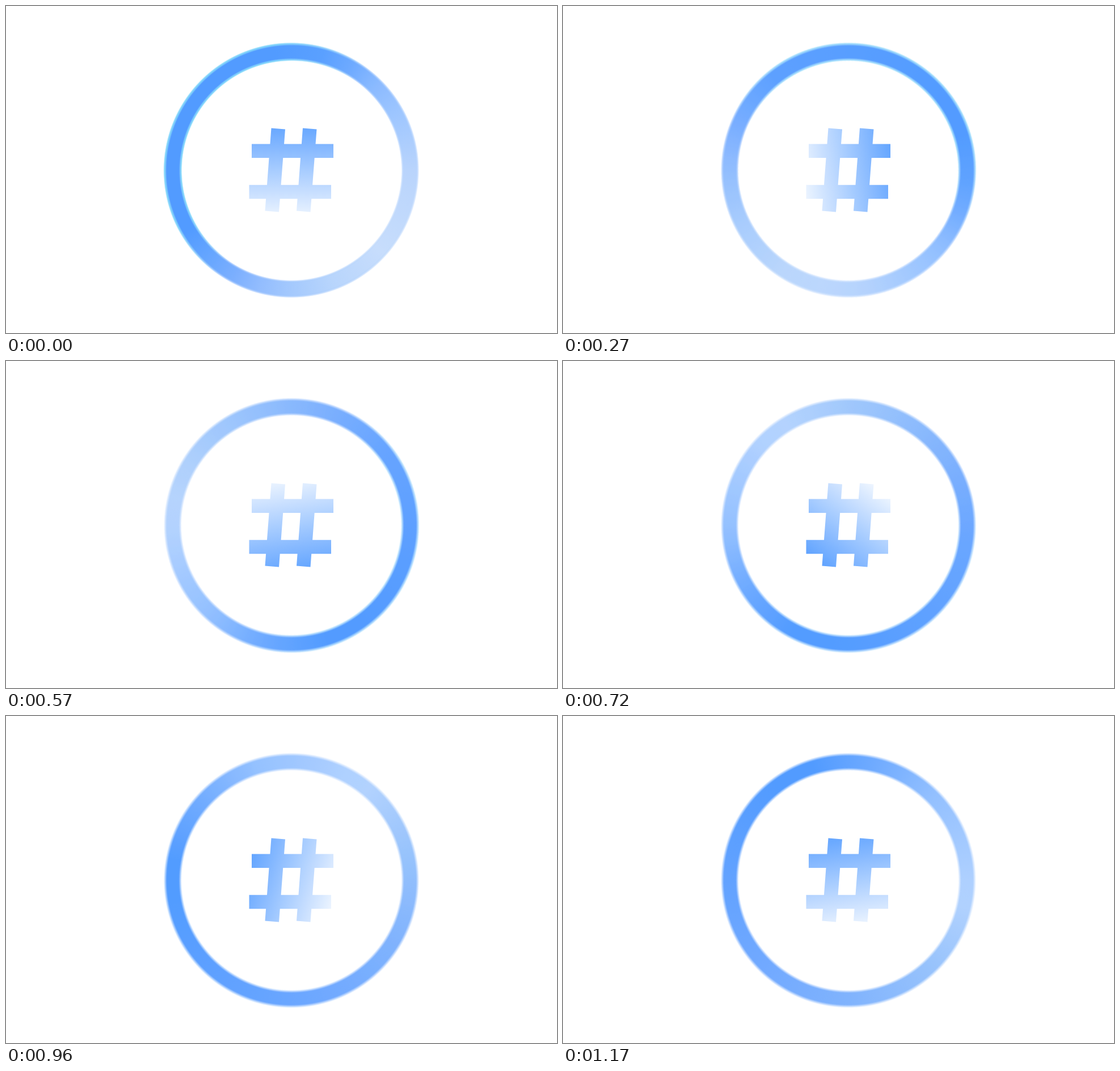
These frames come from a looping animation (971x577 px, 1200 ms). An HTML page:

```html
<!DOCTYPE html>
<html lang="en">
<head>
<meta charset="utf-8">
<title>Loading ring</title>
<style>
  html, body {
    margin: 0;
    width: 100%;
    height: 100%;
    overflow: hidden;
    background: #fff;
  }
  .stage {
    position: relative;
    width: 971px;
    height: 577px;
    overflow: hidden;
  }
  .ring {
    position: absolute;
    left: 273px;
    top: 60px;
    width: 460px;
    height: 460px;
    animation: spin 1.2s steps(40) infinite;
  }
  .ring div {
    position: absolute;
    inset: 0;
  }
  .band {
    -webkit-mask: radial-gradient(circle, transparent 193.5px, #000 198.5px, #000 219.5px, transparent 225px);
    mask: radial-gradient(circle, transparent 193.5px, #000 198.5px, #000 219.5px, transparent 225px);
  }
  .soft {
    background: conic-gradient(from -8deg,
      #529bff, #70abff 30deg, #93c0ff 62deg, #aed0ff 107deg, #b0d1fe 120deg,
      #98c3fc 152deg, #80b3fd 197deg, #71a9ff 242deg, #62a2ff 287deg, #529bff 340deg);
  }
  .vivid {
    background: conic-gradient(from -8deg,
      #529bff, #5aa0ff 23deg, #6eaaff 38deg, #8cbbff 53deg, #9dc6ff 68deg,
      #bad5fc 98deg, #c8defc 140deg, #b9d6fd 168deg, #a5cafe 188deg,
      #94beff 203deg, #7aaeff 218deg, #64a5ff 233deg, #529bff 248deg);
  }
  .rim {
    background: radial-gradient(circle,
      #78d7fa00 192.5px, #78d7fae6 194.8px, #78d7fa00 198px,
      #78d7fa00 220px, #78d7fae6 223.3px, #78d7fa00 226px);
    -webkit-mask: conic-gradient(from -8deg, #000, transparent 45deg, transparent 222deg, #000 255deg);
    mask: conic-gradient(from -8deg, #000, transparent 45deg, transparent 222deg, #000 255deg);
  }
  .glow {
    animation: fade 1.2s cubic-bezier(.35, .62, .7, 1) infinite;
  }
  .hash {
    position: absolute;
    inset: 0;
    clip-path: path("M467.5 215.5L492 217.4L481 363.4L456.5 361.5Z M523 215.5L547.5 217.4L536.5 363.4L512 361.5Z M433 243.5H577V268H433Z M428.5 315.8H573V340.3H428.5Z");
  }
  .hash div {
    position: absolute;
    left: 353px;
    top: 139.5px;
    width: 300px;
    height: 300px;
    background: linear-gradient(#4f99ff 45px, #fff 255px);
    animation: spin 1.2s steps(40) infinite;
  }
  @keyframes spin {
    to { transform: rotate(360deg); }
  }
  @keyframes fade {
    from { opacity: 1; }
    to { opacity: 0; }
  }
</style>
</head>
<body>
<div class="stage">
  <div class="ring">
    <div class="band soft"></div>
    <div class="glow">
      <div class="band vivid"></div>
      <div class="rim"></div>
    </div>
  </div>
  <div class="hash"><div></div></div>
</div>
</body>
</html>
```
